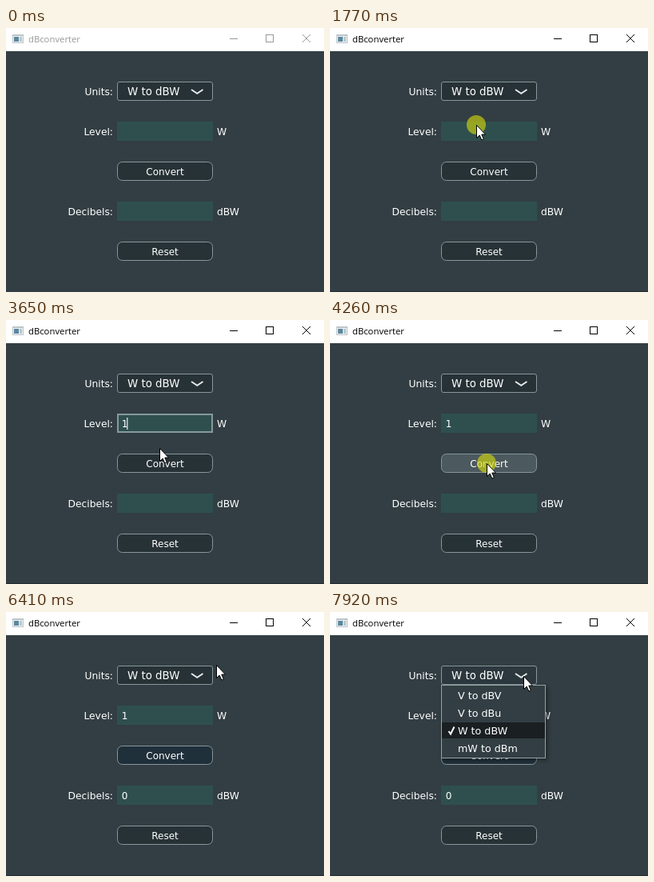
An HTML page with a canvas for the animation above (7.99 s loop, 398x330 px).

```html
<!DOCTYPE html>
<html lang="en">
<head>
<meta charset="utf-8">
<title>dBconverter</title>
<style>
  html, body { margin: 0; width: 100%; height: 100%; overflow: hidden; background: #323e43; }
  canvas { display: block; }
</style>
</head>
<body>
<canvas id="stage" width="398" height="330"></canvas>
<script>
const g = document.getElementById('stage').getContext('2d');
const LOOP = 7990, STEP = 70, CLICK = 130;
const BG = '#323e43', EDGE = '#87969a', DARK = '#273236', HOVER = '#2a383f';
const SANS = '"DejaVu Sans", Verdana, sans-serif';

// When the user does things, in ms
const press = { level: 1770, convert: 4260, units: 7200 };
const focusAt = press.level + CLICK, typeAt = 2710, resultAt = press.convert + CLICK;
const menuAt = press.units + STEP, leaveAt = 6330;

// Pointer gestures: start, end, and the point reached
const moves = [
  [360, 500, 248, 184], [760, 1040, 183, 121], [3510, 3860, 196, 179],
  [5520, 5520, 196, 181], [5590, 5660, 196, 191], [5920, 6090, 196, 193],
  [6260, 6400, 263, 66], [6670, 6740, 245, 72], [7920, 7920, 242, 80]
];
const offStage = [332, 356];

const arrow = new Path2D('M0 0V16L3.7 12.6L6.3 18.5L8.8 17.4L6.3 11.6H11Z');
const chevron = new Path2D('M232 77L239.25 81.8L246.5 77');
const check = new Path2D('M148.5 149L151 152.5L155.5 143.5');
const cross = new Path2D('M371 8L381 18M381 8L371 18');

const during = (t, from, to) => t >= from && t < to;

function pointerAt(t) {
  let [x, y] = offStage;
  for (const [start, end, toX, toY] of moves) {
    if (t < start) break;
    const steps = Math.round((end - start) / STEP) + 1;
    const p = Math.min(1, (Math.floor((t - start) / STEP) + 1) / steps);
    const eased = 1 - (1 - p) ** 1.6;
    x += (toX - x) * eased;
    y += (toY - y) * eased;
  }
  return [Math.round(x), Math.round(y)];
}

function caretVisible(t) {
  return during(t, focusAt, 2230) || during(t, 2640, 3110) || during(t, 3510, 3860);
}

function text(s, x, y, size = 12, align = 'left', color = '#fff', family = SANS) {
  g.font = `${size}px ${family}`;
  g.textAlign = align;
  g.fillStyle = color;
  g.fillText(s, x, y);
}

function rect(x, y, w, h, color) {
  g.fillStyle = color;
  g.fillRect(x, y, w, h);
}

function stroke(path, color, width) {
  g.strokeStyle = color;
  g.lineWidth = width;
  g.stroke(path);
}

function box(y, radius, fill) {
  const path = new Path2D();
  path.roundRect(139.5, y + .5, 119, 23, radius);
  g.fillStyle = fill;
  g.fill(path);
  stroke(path, EDGE, 1);
}

function button(label, y, fill) {
  box(y, 6, fill);
  text(label, 199, y + 17, 12, 'center');
}

function field(y, value, focused) {
  rect(139, y, 120, 24, '#2f4f4f');
  if (focused) {
    g.strokeStyle = '#87999b';
    g.lineWidth = 2;
    g.strokeRect(140, y + 1, 118, 22);
  }
  text(value, 144.7, y + 17);
}

function titleBar(active) {
  const ink = active ? '#000' : '#999';
  rect(0, 0, 398, 29, '#fff');
  rect(8, 8, 14, 11, '#bcc4c7');
  rect(9, 10, 12, 8, '#eef2f3');
  rect(10, 11, 6, 6, '#5b87a0');
  rect(17, 11, 3, 6, '#b5c8cb');
  text('dBconverter', 28, 18, 11.3, 'left', ink, '"Open Sans", "Noto Sans", sans-serif');
  rect(280, 13, 10, 1, ink);
  g.strokeStyle = ink;
  g.lineWidth = 1;
  g.strokeRect(325.5, 8.5, 9, 9);
  stroke(cross, ink, 1);
}

function menu() {
  g.save();
  g.shadowColor = 'rgba(0,0,0,.4)';
  g.shadowBlur = 5;
  g.shadowOffsetX = g.shadowOffsetY = 2;
  rect(139, 91, 131, 92, '#98a2a5');
  g.restore();
  rect(140, 92, 129, 90, BG);
  rect(140, 138, 129, 20, '#1a1f21');
  ['V to dBV', 'V to dBu', 'W to dBW', 'mW to dBm']
    .forEach((s, i) => text(s, 160, 109 + 22 * i, 12.7));
  stroke(check, '#fff', 2);
}

function pointer(t) {
  const [x, y] = pointerAt(t);
  if (Object.values(press).some(p => during(t, p, p + CLICK))) {
    g.beginPath();
    g.arc(x, y, 12, 0, 7);
    g.fillStyle = 'rgba(215,220,10,.62)';
    g.fill();
  }
  g.save();
  g.translate(x + .5, y + .5);
  g.fillStyle = '#fff';
  g.fill(arrow);
  stroke(arrow, '#000', 1);
  g.restore();
}

function convertFill(t) {
  if (t >= leaveAt) return '#20303b';
  if (t >= resultAt) return HOVER;
  if (t >= press.convert) return '#4c595e';
  return during(t, 500, press.level) ? HOVER : DARK;
}

function draw(t) {
  const active = t >= press.level, typed = t >= typeAt, open = t >= menuAt;
  rect(0, 0, 398, 330, BG);
  titleBar(active);
  if (active) rect(0, 329, 398, 1, '#222c30');

  [['Units:', 84], ['Level:', 134], ['Decibels:', 234]]
    .forEach(([s, y]) => text(s, 134, y, 12.3, 'right'));
  text('W', 264, 134, 12.3);
  text('dBW', 264, 234, 12.3);

  box(67, 2.5, open ? '#2c383d' : DARK);
  text('W to dBW', 152, 84, 13.33);
  stroke(chevron, '#e4e8e9', 2);

  field(117, typed ? '1' : '', during(t, focusAt, press.convert));
  if (caretVisible(t)) rect(typed ? 151 : 144, 122, 1.5, 15, '#c5d0d0');
  button('Convert', 167, convertFill(t));
  field(217, t >= resultAt ? '0' : '', false);
  button('Reset', 267, DARK);
  if (open) menu();
  pointer(t);
}

const start = performance.now();
function tick() {
  draw((performance.now() - start) % LOOP);
  requestAnimationFrame(tick);
}
tick();
</script>
</body>
</html>
```
